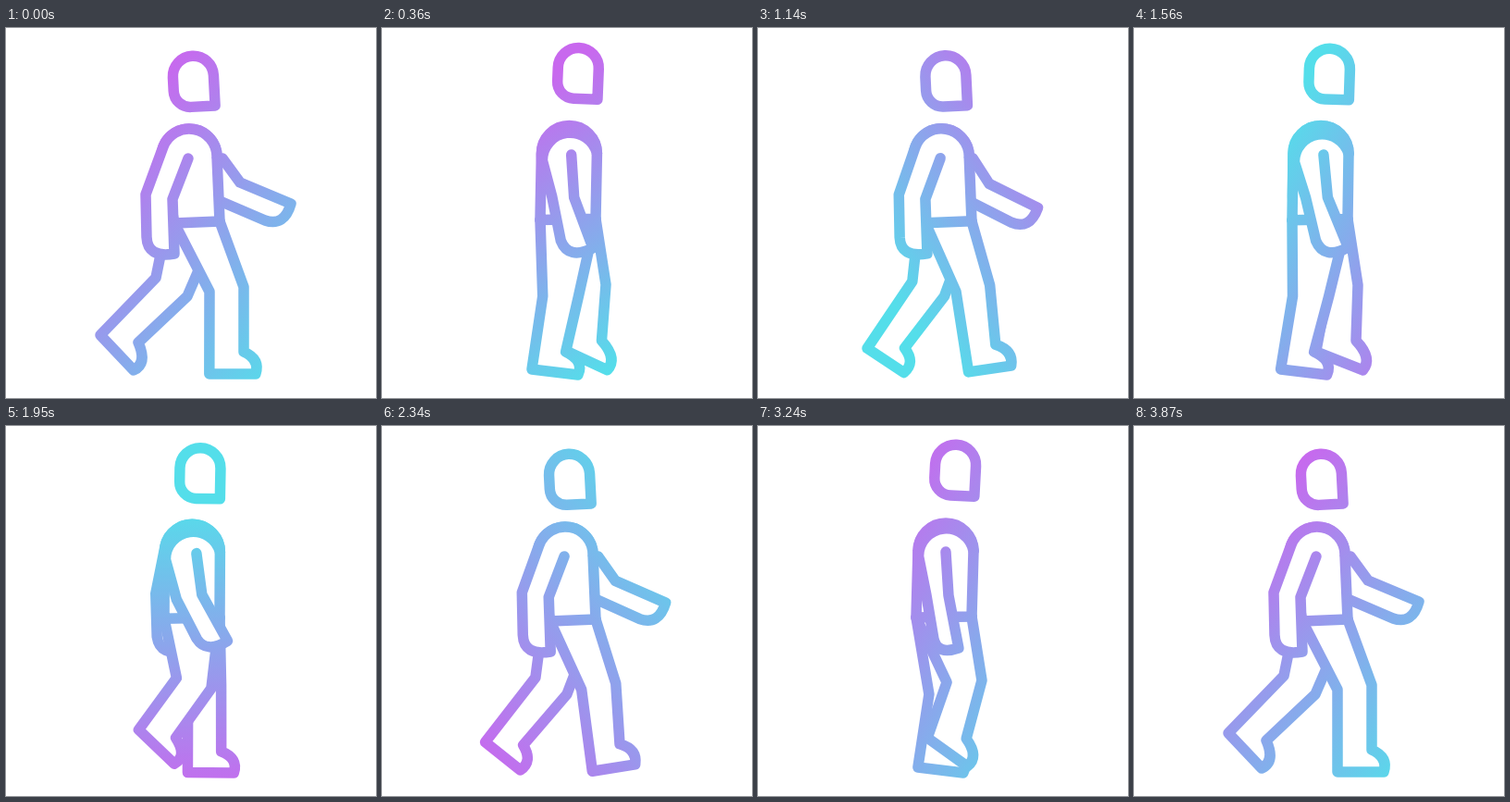
An HTML page for the animation above (3900 ms loop, 400 px wide and 400 px high).

```html
<!DOCTYPE html>
<html lang="en">
<head>
<meta charset="utf-8">
<title>Walking figure</title>
<style>
  html, body { margin: 0; width: 100%; height: 100%; overflow: hidden; background: #fff; }
  svg { display: block; width: 100vw; height: 100vh; }
  path { fill: #fff; stroke: url(#tint); stroke-width: 11.5; stroke-linecap: round; stroke-linejoin: round; }
</style>
</head>
<body>
<svg viewBox="0 0 400 400">
  <defs>
    <linearGradient id="tint" gradientUnits="userSpaceOnUse">
      <stop offset="0" stop-color="#c868ee"/>
      <stop offset="1" stop-color="#54deea"/>
    </linearGradient>
  </defs>
  <path id="farArm"/>
  <path id="farLeg"/>
  <path id="nearLeg"/>
  <path id="torso"/>
  <path id="nearArm"/>
  <path id="head"/>
</svg>
<script>
const LOOP = 3900, CYCLE = 1180, CYCLES = 3, SHOULDER = 30;
const el = id => document.getElementById(id);

// phase, then x,y of: back knee, heel, toe, ankle, front knee
const legKeys = wrap([
  [0, 220,285, 220,374, 270,374, 257,350, 257,280],
  [.136, 199,290, 200,375, 250,375, 236,352, 235,280],
  [.246, 185,290, 173,369, 222,375, 212,350, 221,285],
  [.33, 171,290, 157,369, 207,375, 193,350, 210,290],
  [.483, 166,272, 112,342, 150,372, 153,345, 200,290],
  [.5, 162,270, 102,332, 138,370, 143,340, 196,290],
  [.636, 181,272, 137,328, 175,365, 177,337, 218,285],
  [.746, 204,277, 183,337, 226,368, 225,338, 242,275],
  [.83, 208,292, 198,351, 249,370, 241,338, 242,278],
  [.98, 215,285, 228,373, 274,365, 257,343, 252,278]
]);

// phase, then x,y of: armpit, inner elbow, fingertip, hand curve, outer wrist, outer elbow
const armKeys = wrap([
  [0, 197,141, 180,185, 182,244, 153,249, 152,226, 151,180],
  [.33, 205,137, 210,183, 233,237, 207,251, 198,230, 186,183],
  [.5, 206,141, 225,167, 280,190, 273,215, 252,208, 196,184],
  [.636, 206,138, 213,182, 244,230, 222,246, 210,230, 185,188],
  [.746, 203,136, 206,183, 217,240, 194,248, 190,230, 182,183]
]);

// ms, angle, offset at the stage centre, length
const tintKeys = [
  [0, 41, .39, 320],
  [750, 90, .53, 280],
  [1560, 210, .71, 290],
  [2340, 322, .51, 342],
  [2760, 360, .41, 230],
  [3240, 392, .39, 312],
  [3900, 401, .39, 320]
];

function wrap(rows) {
  const shift = (row, by) => [row[0] + by, ...row.slice(1)];
  return [...rows.slice(-2).map(r => shift(r, -1)), ...rows, ...rows.slice(0, 2).map(r => shift(r, 1))];
}

function slope(rows, i, c) {
  if (i === 0 || i === rows.length - 1) return 0;
  const rate = j => (rows[j + 1][c] - rows[j][c]) / (rows[j + 1][0] - rows[j][0]);
  const a = rate(i - 1), b = rate(i);
  return a * b <= 0 ? 0 : 2 * a * b / (a + b);
}

// Monotone cubic interpolation of every column
function sample(rows, t) {
  let i = 0;
  while (i < rows.length - 2 && t >= rows[i + 1][0]) i++;
  const a = rows[i], b = rows[i + 1], h = b[0] - a[0], u = (t - a[0]) / h;
  const s = u * u * (3 - 2 * u);
  return a.slice(1).map((v, k) => {
    const c = k + 1;
    return v + (b[c] - v) * s
      + h * u * (1 - u) * ((1 - u) * slope(rows, i, c) - u * slope(rows, i + 1, c));
  });
}

function pose(rows, phase, dx = 0) {
  const v = sample(rows, phase % 1), pts = [];
  for (let i = 0; i < v.length; i += 2) pts.push([v[i] + dx, v[i + 1]]);
  return pts;
}

const at = p => p[0].toFixed(2) + ' ' + p[1].toFixed(2);
const line = pts => 'M' + pts.map(at).join('L');
const arc = (r, to) => `A${r} ${r} 0 0 1 ${at(to)}`;

function leg(phase, hipBack, hipFront) {
  const [back, heel, toe, ankle, knee] = pose(legKeys, phase);
  const dx = toe[0] - heel[0], dy = toe[1] - heel[1], len = Math.hypot(dx, dy);
  const ux = dx / len, uy = dy / len;
  const cap = [toe[0] + 5 * ux + 16 * uy, toe[1] + 5 * uy - 16 * ux];
  return line([hipBack, back, heel, toe]) + `Q${at(cap)} ${at(ankle)}L${at(knee)}L${at(hipFront)}`;
}

function arm(phase, c, dx) {
  const [pit, elbow, tip, curve, wrist, outer] = pose(armKeys, phase, dx);
  const x = outer[0] - c[0], y = outer[1] - c[1];
  const a = Math.atan2(y, x) + Math.acos(Math.min(1, SHOULDER / Math.hypot(x, y)));
  const top = [c[0] + SHOULDER * Math.cos(a), c[1] + SHOULDER * Math.sin(a)];
  return line([pit, elbow, tip]) + `Q${at(curve)} ${at(wrist)}L${at(outer)}L${at(top)}`
    + arc(SHOULDER, [c[0] + SHOULDER, c[1]]);
}

function head(bob) {
  const a = -3 * bob * Math.PI / 180, cos = Math.cos(a), sin = Math.sin(a);
  const p = (x, y) => [208 - 5.3 * bob + x * cos - y * sin, 52.7 + 5 * bob + x * sin + y * cos];
  return 'M' + at(p(-22, -5.5)) + arc(22, p(22, -5.5)) + 'L' + at(p(22, 27.5))
    + 'L' + at(p(-4, 27.5)) + arc(18, p(-22, 9.5)) + 'Z';
}

function tint(t) {
  const [angle, mid, len] = sample(tintKeys, t);
  const a = angle * Math.PI / 180, g = el('tint');
  const set = (n, d) => {
    g.setAttribute('x' + n, 200 + d * Math.cos(a));
    g.setAttribute('y' + n, 200 + d * Math.sin(a));
  };
  set(1, -len * mid);
  set(2, len * (1 - mid));
}

function draw(t) {
  // Three strides, then the pose rests while the tint settles
  const phase = Math.min(t / CYCLE, CYCLES) % 1;
  const bob = Math.cos(4 * Math.PI * phase);
  const c = [200.5 - 2.5 * bob, 137 + 2 * bob];
  const hipL = [171 + 11 * Math.max(0, bob), 209 + 2 * bob];
  const hipR = [231, 207.5 + 1.5 * bob];
  const reach = 30 * Math.max(0, Math.cos(2 * Math.PI * phase)) ** 3 - 2;
  const put = (id, d) => el(id).setAttribute('d', d);

  put('farArm', arm(phase + .5, c, reach));
  put('farLeg', leg(phase + .5, [hipL[0] - 8 * Math.max(0, bob), hipL[1]], hipR));
  put('nearLeg', leg(phase, hipL, hipR));
  put('torso', line([hipL, [c[0] - SHOULDER, c[1]]]) + arc(SHOULDER, [c[0] + SHOULDER, c[1]])
    + `L${at(hipR)}Z`);
  put('nearArm', arm(phase, c, 0));
  put('head', head(bob));
  tint(t);
}

const start = performance.now();
function tick() {
  draw((performance.now() - start) % LOOP);
  requestAnimationFrame(tick);
}
tick();
</script>
</body>
</html>
```
